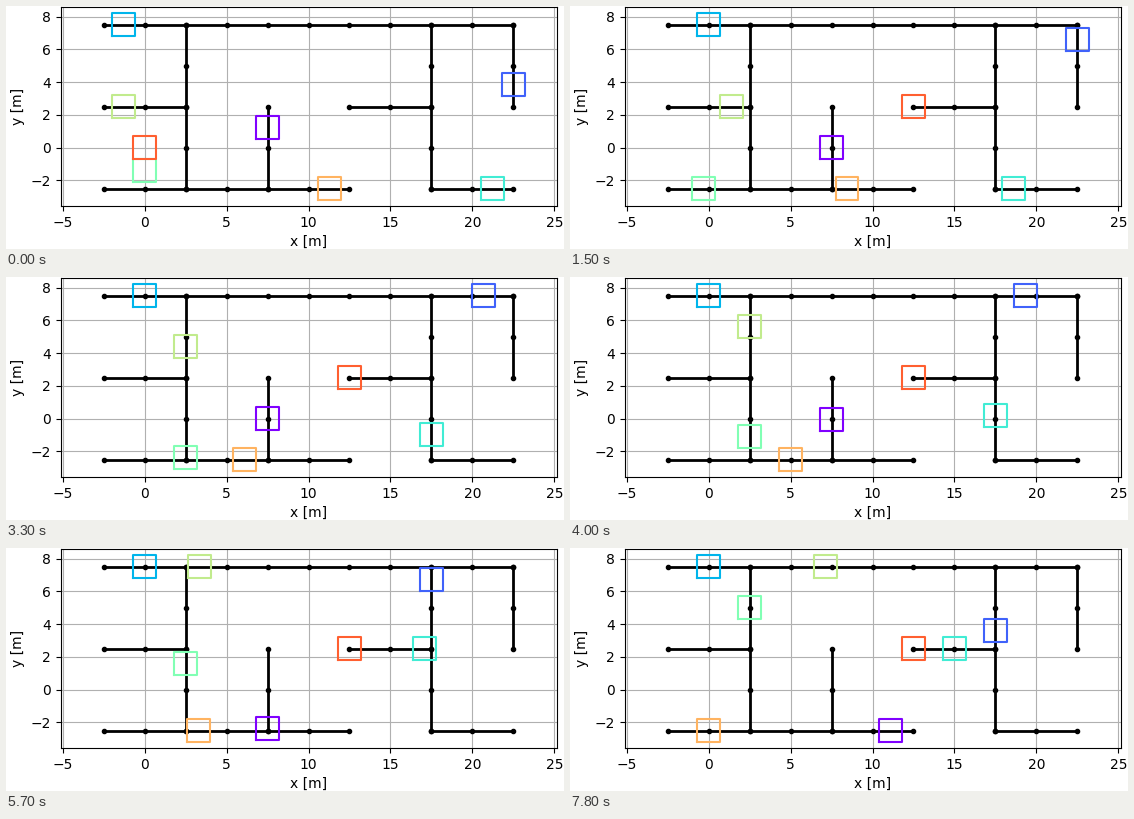
Write a matplotlib script that moves like this. It is 558 by 243 pixels and loops after 8 s.

```python
import numpy as np
import matplotlib.pyplot as plt
from matplotlib.animation import FuncAnimation

plt.rcParams["font.family"] = "DejaVu Sans"

WIDTH, HEIGHT, DPI = 558, 243, 100
BOX = 1.4
ROBOTS = 8
LAUNCH = 3  # tick at which the parked robots enter the map

# The fleet advances in bursts: (first frame, last frame, ticks).
BURSTS = [(2, 5, 3), (8, 18, 8), (20, 29, 6), (31, 34, 3), (37, 40, 3),
          (43, 48, 4), (51, 57, 4), (58, 60, 2), (62, 72, 7), (74, 78, 3)]
TICKS = np.concatenate([np.rint(np.linspace(*burst)) for burst in BURSTS])


def draw_corridor(*corners):
    for start, end in zip(corners, corners[1:]):
        count = int(max(abs(np.subtract(start, end))) / 2.5) + 1
        ax.plot(*np.linspace(start, end, count).T, "k.-", lw=2)


def add_robot(path, ticks=(0,), travelled=(0,), parked=None):
    """Follow path; travelled is the distance covered at each of ticks."""
    xs, ys = np.array(path).T
    lengths = np.hypot(np.diff(xs), np.diff(ys))
    along = np.append(0, np.cumsum(lengths))

    def locate(tick):
        if parked and tick < LAUNCH:
            return parked
        distance = np.interp(tick, ticks, travelled)
        return np.interp(distance, along, xs), np.interp(distance, along, ys)

    color = plt.cm.rainbow(len(robots) / ROBOTS)
    line, = ax.plot([], [], lw=1.5, color=color)
    robots.append((line, locate))


fig = plt.figure(figsize=(WIDTH / DPI, HEIGHT / DPI), dpi=DPI,
                 facecolor="white")
ax = fig.add_axes([54.5 / WIDTH, 43.1 / HEIGHT, 496 / WIDTH, 198.4 / HEIGHT])
ax.set(xlim=(-5.125, 25.125), ylim=(-3.55, 8.55),
       xticks=range(-5, 26, 5), yticks=range(-2, 9, 2),
       xlabel="x [m]", ylabel="y [m]")
ax.grid(True)

draw_corridor((-2.5, 7.5), (22.5, 7.5), (22.5, 2.5))
draw_corridor((-2.5, 2.5), (2.5, 2.5))
draw_corridor((2.5, 7.5), (2.5, -2.5))
draw_corridor((-2.5, -2.5), (12.5, -2.5))
draw_corridor((7.5, 2.5), (7.5, -2.5))
draw_corridor((12.5, 2.5), (17.5, 2.5))
draw_corridor((17.5, 7.5), (17.5, -2.5), (22.5, -2.5))

robots = []
add_robot([(7.5, 1.22), (7.5, -2.5), (12.5, -2.5)],
          (0, 4, 22.8, 31, 43), (0, 1.22, 1.22, 3.59, 7.32))
add_robot([(22.5, 3.83), (22.5, 7.5), (17.5, 7.5), (17.5, 2.5)],
          (0, 12, 13.4, 23, 36.4, 38.7, 43),
          (0, 3.67, 3.67, 6.83, 11.17, 11.17, 12.57))
add_robot([(-1.27, 7.5), (0, 7.5)], (0, 4), (0, 1.27))
add_robot([(21.22, -2.5), (17.5, -2.5), (17.5, 2.5), (15, 2.5)],
          (0, 9, 12.4, 13.9, 23, 37), (0, 2.62, 3.72, 3.72, 6.41, 11.22))
add_robot([(-2.5, -2.5), (2.5, -2.5), (2.5, 5)],
          (3, 10, 10.7, 23, 31, 42), (0.3, 2.5, 2.5, 6.41, 9.1, 12.5),
          parked=(0, -BOX))
add_robot([(-1.27, 2.5), (2.5, 2.5), (2.5, 7.5), (10, 7.5)],
          (0, 16, 23, 31, 37, 43), (0, 4.75, 6.89, 9.62, 11.27, 13.4))
add_robot([(11.28, -2.5), (0, -2.5)],
          (0, 12, 14.7, 22.5, 25.8, 33.5, 34.4, 42.2),
          (0, 3.78, 3.78, 6.28, 6.28, 8.78, 8.78, 11.28))
add_robot([(12.5, 2.5), (17.5, 2.5)], parked=(0, 0))

corner_x = BOX / 2 * np.array([-1, 1, 1, -1, -1])
corner_y = BOX / 2 * np.array([-1, -1, 1, 1, -1])


def update(frame):
    tick = np.searchsorted(TICKS, frame, side="right")
    for line, locate in robots:
        x, y = locate(tick)
        line.set_data(x + corner_x, y + corner_y)
    return [line for line, _ in robots]


anim = FuncAnimation(fig, update, frames=80, interval=100,
                     repeat=True, repeat_delay=0)
plt.show()
```
